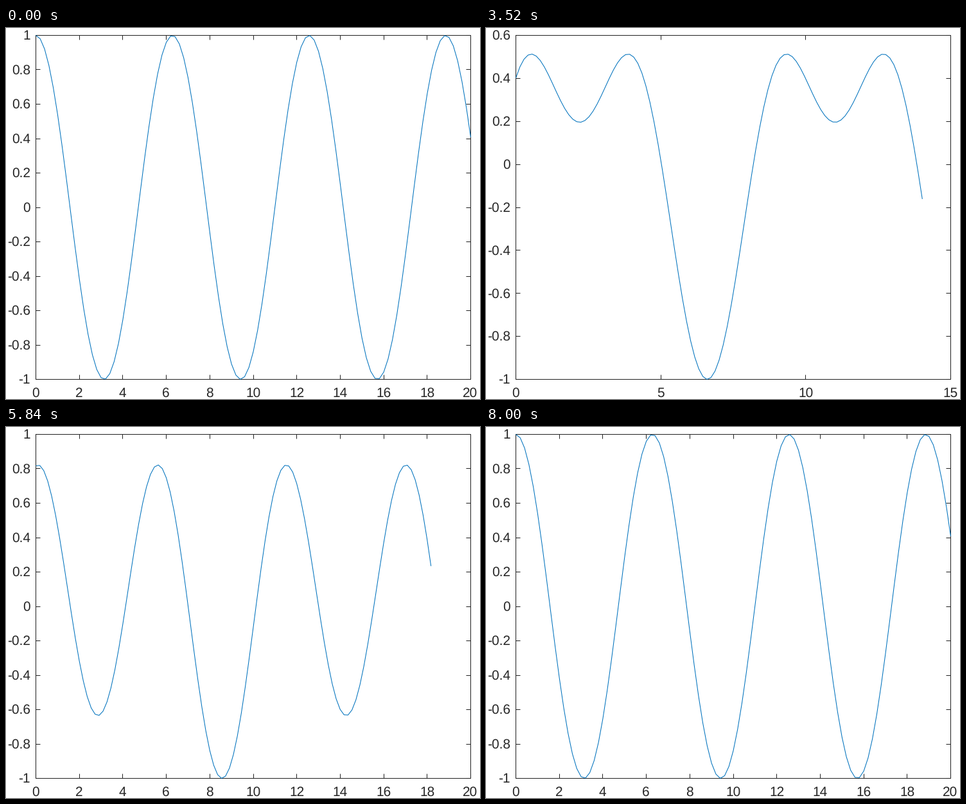
These frames come from a looping animation (738 by 577 pixels, 8.08 s). A matplotlib script:

```python
import math

import matplotlib.pyplot as plt
import numpy as np
from matplotlib.animation import FuncAnimation
from matplotlib.collections import LineCollection

# At 150 dpi the 10 pt labels and 0.5 pt lines get their pixel sizes.
W, H, DPI = 738, 577, 150
FONT, LINE = 10, 0.5
EM = FONT * DPI / 72
LEFT, RIGHT, TOP, BOTTOM = 46.5, 723.5, 11.5, 546.5
TICK = 7
FRAMES, INTERVAL = 101, 80
INK, BLUE = "#262626", "#0072BD"

plt.rcParams["font.family"] = "Liberation Sans"
plt.rcParams["text.hinting"] = "no_hinting"

u = np.linspace(0, 1, 101)

fig = plt.figure(figsize=(W / DPI, H / DPI), dpi=DPI, facecolor="white")
ax = fig.add_axes([0, 0, 1, 1])
ax.set_xlim(0, W)
ax.set_ylim(H, 0)
ax.axis("off")

ax.plot([LEFT, RIGHT, RIGHT, LEFT, LEFT], [TOP, TOP, BOTTOM, BOTTOM, TOP],
        color=INK, lw=LINE, solid_joinstyle="miter",
        solid_capstyle="projecting", snap=False)
ticks = LineCollection([], colors=INK, linewidths=LINE, snap=False)
ax.add_collection(ticks)
curve, = ax.plot([], [], color=BLUE, lw=LINE, snap=False, zorder=3,
                 solid_capstyle="butt")
x_labels, y_labels = [
    [ax.text(0, 0, "", ha="left", va="baseline", size=FONT, color=INK)
     for _ in range(11)] for _ in range(2)]


def blend(frame):
    """Smoothstep from sine to cosine; the loop opens on the cosine."""
    if frame == 0:
        return 1.0
    t = (frame - 1) / (FRAMES - 2)
    return t * t * (3 - 2 * t)


def x_axis(top):
    """Upper limit and tick step for the horizontal axis."""
    if top <= 10:
        return 10, 1
    if 14 < top <= 15:
        return 15, 5
    return 2 * math.ceil(top / 2 - 1e-9), 2


def y_axis(top):
    """Upper limit of the vertical axis, in steps of 0.2."""
    return max(0.6, math.ceil(top * 5 - 1e-9) / 5)


def advance(text):
    """Width of a number including its side bearings."""
    return EM * sum({".": 0.278, "-": 0.333}.get(c, 0.556) for c in text)


def put(label, text, x, y, align):
    label.set_text(text)
    label.set_position((math.floor(x - align * advance(text)), y))


def crisp(v):
    """Centre of the pixel that holds v."""
    return math.floor(v) + 0.5


def draw(frame):
    s = blend(frame)
    x = (1 - s) * 10 * u + s * 20 * u
    y = (1 - s) * np.sin(10 * u) + s * np.cos(20 * u)
    x_max, step = x_axis(x[-1])
    y_max = y_axis(y.max())

    def to_x(v):
        return LEFT + (RIGHT - LEFT) * v / x_max

    def to_y(v):
        return TOP + (BOTTOM - TOP) * (y_max - v) / (y_max + 1)

    curve.set_data(to_x(x), to_y(y))

    for label in x_labels + y_labels:
        label.set_text("")
    marks = []
    for label, v in zip(x_labels, range(0, x_max + 1, step)):
        px = to_x(v)
        put(label, str(v), px, 574, 0.5)
        px = crisp(px)
        marks += [[(px, BOTTOM), (px, BOTTOM - TICK)],
                  [(px, TOP), (px, TOP + TICK)]]
    for label, k in zip(y_labels, range(-5, round(y_max * 5) + 1)):
        py = to_y(k / 5)
        put(label, f"{k / 5:g}", 38.5, round(py + 6.75), 1)
        py = crisp(py)
        marks += [[(LEFT, py), (LEFT + TICK, py)],
                  [(RIGHT, py), (RIGHT - TICK, py)]]
    ticks.set_segments(marks)
    return [curve, ticks, *x_labels, *y_labels]


anim = FuncAnimation(fig, draw, frames=FRAMES, interval=INTERVAL,
                     init_func=lambda: draw(0), repeat=True, repeat_delay=0)
plt.show()
```
